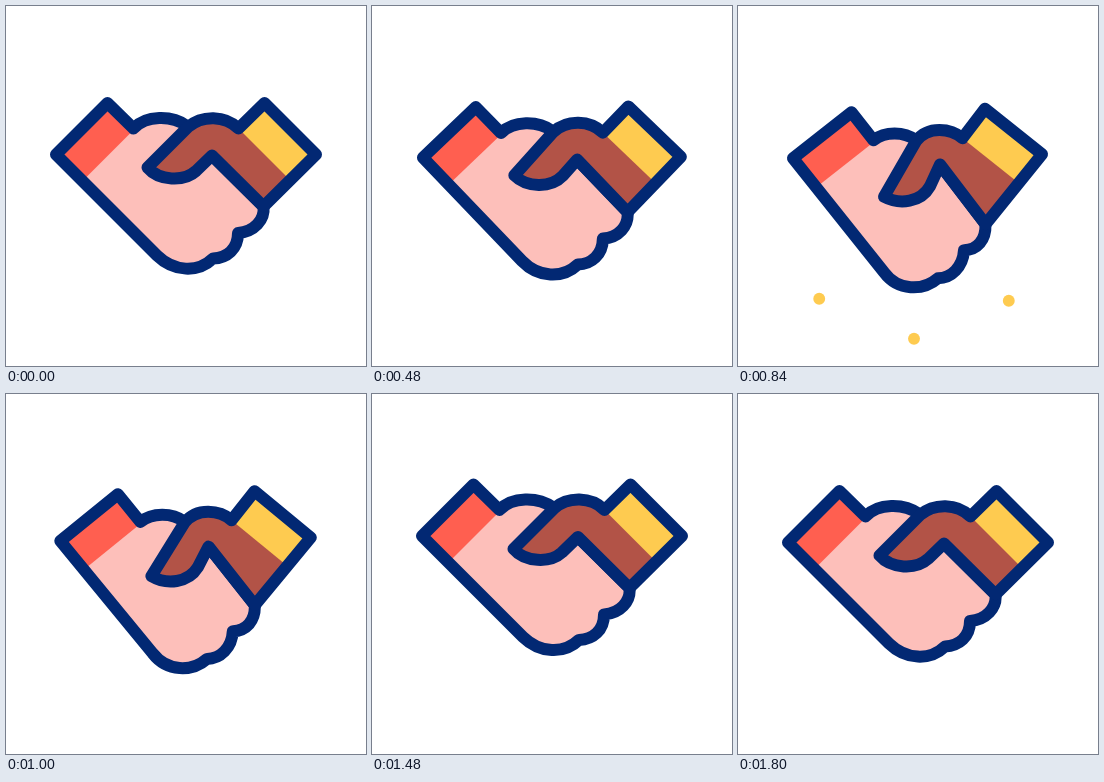
Animation of 360 by 360 pixels, one loop 1.84 s. Source, as an HTML page:

```html
<!DOCTYPE html>
<html lang="en">
<head>
<meta charset="utf-8">
<title>Handshake</title>
<style>
  html, body { margin: 0; width: 100%; height: 100%; overflow: hidden; background: #fff; }
  svg { display: block; width: 100vw; height: 100vh; }
  .line { fill: none; stroke: #022873; stroke-width: 12; stroke-linejoin: round; stroke-linecap: round; }
</style>
</head>
<body>
<svg viewBox="0 0 360 360">
  <g fill="#fecb50">
    <circle class="dot"/><circle class="dot"/><circle class="dot"/>
  </g>
  <g id="hands">
    <path data-shape="left" fill="#fdbfba"/>
    <path data-shape="leftCuff" fill="#ff5f50"/>
    <path data-shape="left" class="line"/>
    <path data-shape="right" fill="#b25347"/>
    <path data-shape="rightCuff" fill="#fecb50"/>
    <path data-shape="right" class="line"/>
  </g>
</svg>
<script>
const LOOP = 1840;

// Each shape: [relaxed pose, squeezed pose], same commands in both.
const shapes = {
  left: [
    `M101.5 97 L50 148.5 L151 249.5 C168 266 192 267 207 252.5 C221 252 232 243 232 227
     C248 226 259 214 257.5 200.5 L206 149.5 L181 120 C166 109 140 109 127.5 122.5 Z`,
    `M113.5 107 L55 153 L146 267 C160 286 185 286 200 273 C213 273 225 262 226 245
     C239 245 248 235 247.5 219 L202 159.3 L178 135 C166 126 147 126 135.5 135 Z`
  ],
  leftCuff: [
    'M101.5 97 L50 148.5 L76.5 175 L128 123.5 Z',
    'M113.5 107 L55 153 L78 182.2 L136.5 136.2 Z'
  ],
  right: [
    `M258.5 97 L310 148.5 L257.5 200.5 L206 149.5 L190 165 C178 176 153 175 141.5 161.5
     L182 121 C196 109 219 109 232.5 122.5 Z`,
    `M247 103.5 L304 149 L247.5 219 L202 159.3 L192 181 C183 197 162 200 146 191.5
     L178 136 C190 120 213 123 224.5 133 Z`
  ],
  rightCuff: [
    'M258.5 97 L310 148.5 L284 174 L232.5 122.5 Z',
    'M247 103.5 L304 149 L281 178 L224.5 133 Z'
  ]
};

// Start and end of each droplet.
const drops = [
  [129, 247, 81, 293],
  [176, 268, 176, 333],
  [223, 249, 271, 295]
];

const mix = (a, b, k) => a + (b - a) * k;
const span = (t, from, to) => Math.min(1, Math.max(0, (t - from) / (to - from)));
const smooth = u => u * u * (3 - 2 * u);
const cubic = u => u < .5 ? 4 * u ** 3 : 1 - 4 * (1 - u) ** 3;
const easeOut = u => 1 - (1 - u) ** 2;

function morph([a, b], k) {
  const ends = b.match(/[\d.]+/g);
  let i = 0;
  return a.replace(/[\d.]+/g, n => mix(+n, +ends[i++], k).toFixed(2));
}

const hands = document.getElementById('hands');
const parts = [...hands.children];
const dots = [...document.querySelectorAll('.dot')];

function draw(t) {
  const squeeze = cubic(span(t, 300, 800)) - cubic(span(t, 860, 1300));
  const lift = 6.5 * smooth(span(t, 300, 650))
             - 13.3 * smooth(span(t, 770, 1250))
             + 6.8 * smooth(span(t, 1440, 1820));
  // The squeezed pose already sits 6.5 lower.
  hands.setAttribute('transform', `translate(0 ${(lift - 6.5 * squeeze).toFixed(2)})`);
  for (const p of parts) p.setAttribute('d', morph(shapes[p.dataset.shape], squeeze));

  const fly = easeOut(span(t, 580, 860));
  const size = t < 580 ? 0 : 6 * (1 - span(t, 840, 940));
  dots.forEach((dot, i) => {
    const [x0, y0, x1, y1] = drops[i];
    dot.setAttribute('cx', mix(x0, x1, fly));
    dot.setAttribute('cy', mix(y0, y1, fly));
    dot.setAttribute('r', size);
  });
}

const start = performance.now();
function tick() {
  draw((performance.now() - start) % LOOP);
  requestAnimationFrame(tick);
}
tick();
</script>
</body>
</html>
```
